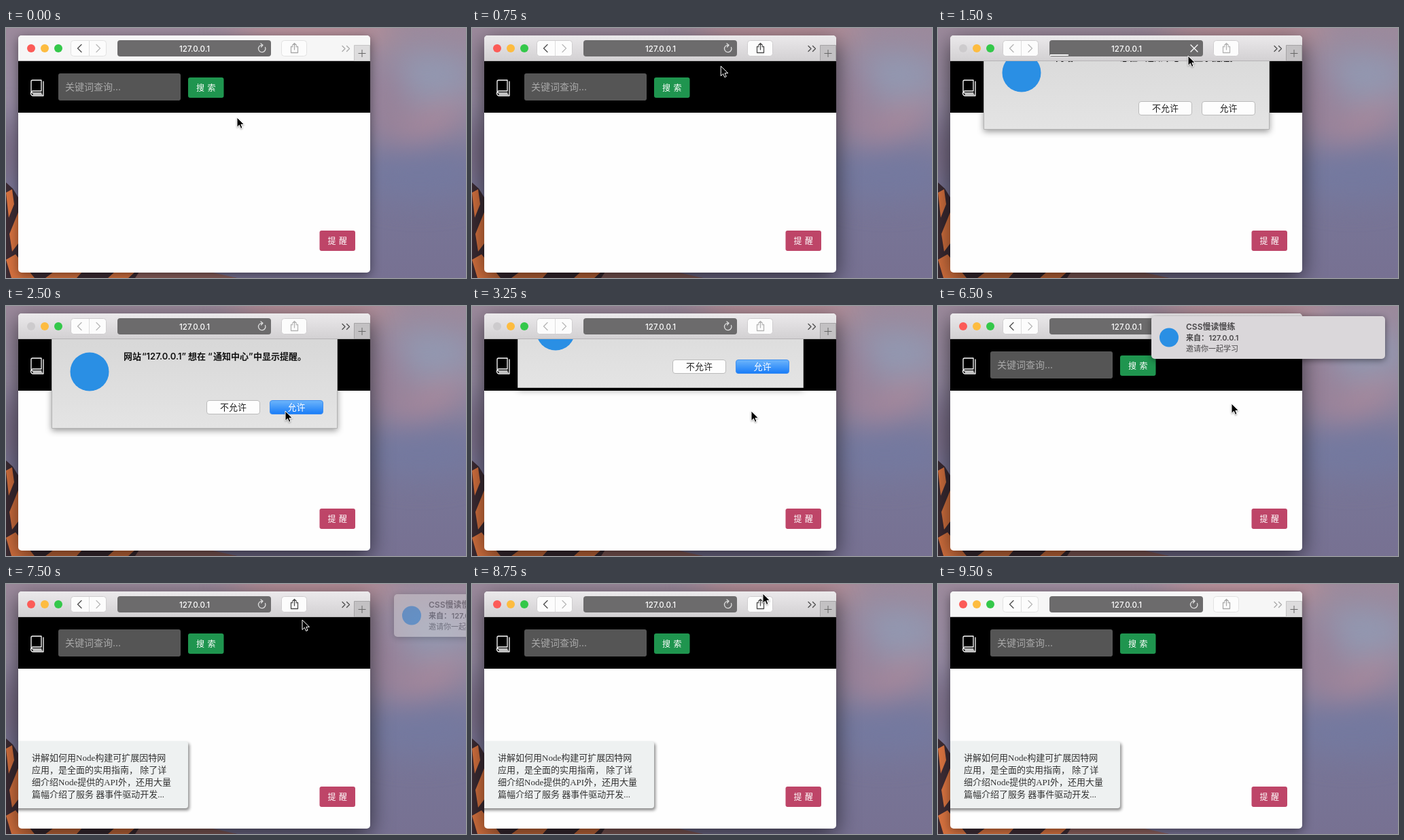
These frames come from a looping animation (677 by 369 pixels, 9.75 s). An HTML page:

```html
<!DOCTYPE html>
<html lang="zh-CN">
<head>
<meta charset="utf-8">
<style>
html, body { margin: 0; width: 100%; height: 100%; overflow: hidden }
svg { display: block; width: 677px; height: 369px; font: 13px Inter, "Noto Sans CJK SC", "Noto Sans CJK", sans-serif }
.line { fill: none; stroke-width: 1.3; stroke-linecap: round; stroke-linejoin: round }
.tool { fill: #fcfcfc; stroke: #cfcdcf }
.mid { text-anchor: middle }
.bold { font-weight: 600 }
.blur { filter: blur(22px) }
#frame { filter: drop-shadow(0 9px 16px #0009) }
#bar { fill: url(#barOn) }
#tab { fill: #c3c1c3; stroke: #a5a3a5 }
#close { fill: #fc5b57 } #shrink { fill: #fdbc40 } #grow { fill: #34c84a }
#back, #share, #more { stroke: #4c4c4c }
#next { stroke: #b9b9b9 }
#stop, #progress, #card, #dialog { display: none }

.idle #frame { filter: drop-shadow(0 4px 8px #0007) }
.idle #bar { fill: #f6f6f6 }
.idle #tab { fill: #dddcdd; stroke: #c6c6c6 }
.idle .lights circle { fill: #d9d8d9 }
.idle #share, .idle #more { stroke: #a9a9a9 }
.idle .tool { stroke: #e2e2e2 }

.ask #dialog { display: inline }
.ask #close { fill: #cdcbcd }
.ask #back, .ask #share { stroke: #b4b4b4 }
.load #stop, .load #progress { display: inline }
.load #reload { display: none }
.load #allow { fill: #fdfdfd; stroke: #bbb }
.load #allowText { fill: #222 }
.open #card { display: inline }
</style>
</head>
<body>
<svg id="stage" viewBox="0 0 677 369">
  <defs>
    <linearGradient id="sky" x2="0" y2="1">
      <stop stop-color="#9c8a9c"/><stop offset=".3" stop-color="#9489a0"/>
      <stop offset=".6" stop-color="#787799"/><stop offset="1" stop-color="#777192"/>
    </linearGradient>
    <linearGradient id="barOn" x2="0" y2="1"><stop stop-color="#ebe9eb"/><stop offset="1" stop-color="#d2d0d2"/></linearGradient>
    <linearGradient id="sheet" x2="0" y2="1"><stop stop-color="#d5d5d5"/><stop offset="1" stop-color="#e4e4e4"/></linearGradient>
    <linearGradient id="blue" x2="0" y2="1"><stop stop-color="#6db5fb"/><stop offset="1" stop-color="#187cf8"/></linearGradient>
    <clipPath id="below"><path d="M0 49H677V369H0Z"/></clipPath>
    <clipPath id="page"><path d="M18 49H536V361H18Z"/></clipPath>
  </defs>

  <rect width="677" height="369" fill="url(#sky)"/>
  <g class="blur">
    <ellipse cx="450" cy="0" rx="120" ry="30" fill="#b98f97"/>
    <ellipse cx="620" cy="70" rx="70" ry="34" fill="#9298b1"/>
    <ellipse cx="560" cy="110" rx="30" ry="60" fill="#978198"/>
    <ellipse cx="625" cy="140" rx="55" ry="16" fill="#b0899a" transform="rotate(-28 625 140)"/>
    <ellipse cx="610" cy="215" rx="90" ry="36" fill="#74799f"/>
    <ellipse cx="0" cy="185" rx="30" ry="50" fill="#766880"/>
  </g>
  <path fill="#3b2b33" d="M0 228L10 237 18 250 70 345 340 369H0Z"/>
  <path fill="#d4713f" d="M0 243L9 238 12 260 4 280ZM5 304L18 272V318L9 330ZM0 342L14 334 42 369H8ZM58 369L70 360H112L104 369ZM150 369L160 360H190L180 369Z"/>
  <path fill="#8a5f5c" d="M196 360H300L340 369H190Z"/>

  <rect id="frame" x="18" y="11" width="518" height="350" rx="5" fill="#fefefe"/>
  <path id="bar" d="M18 49V16a5 5 0 0 1 5-5H531a5 5 0 0 1 5 5V49Z"/>
  <path stroke="#b5b3b5" d="M18 48.5H536"/>
  <g class="lights">
    <circle id="close" cx="37" cy="30" r="6"/><circle id="shrink" cx="57" cy="30" r="6"/><circle id="grow" cx="77" cy="30" r="6"/>
  </g>
  <rect class="tool" x="95.5" y="18.5" width="52" height="23" rx="4"/>
  <path stroke="#dcdcdc" d="M122.5 19V41"/>
  <path id="back" class="line" d="M111 24.500L105.500 30 111 35.500"/>
  <path id="next" class="line" d="M133 24.500L138.500 30 133 35.500"/>
  <rect x="164" y="18" width="226" height="24" rx="4" fill="#6c6b6c"/>
  <text class="mid" x="277.500" y="34.500" fill="#fff" font-size="11.500" font-weight="500">127.0.0.1</text>
  <path id="progress" stroke="#fff" stroke-width="2" d="M165 40H192"/>
  <path id="reload" class="line" stroke="#ddd" d="M381.500 28.500A5.200 5.200 0 1 1 377 25.300M375 23L378 25.300 375.500 28"/>
  <path id="stop" class="line" stroke="#fff" d="M372 25L382 35M382 25L372 35"/>
  <rect class="tool" x="405.500" y="18.500" width="37" height="23" rx="4"/>
  <path id="share" class="line" d="M422 27.500H419.500V36.500H429.500V27.500H427M424.500 32V22.500M421.500 25.500L424.500 22.500 427.500 25.500"/>
  <path id="more" class="line" d="M495 26.500L499 30.500 495 34.500M501.500 26.500L505.500 30.500 501.500 34.500"/>
  <path id="tab" d="M512.500 48.500V25.500H535.500V48.500Z"/>
  <path stroke="#666" d="M518.500 37.500H529.500M524 32V43"/>

  <path d="M18 49H536V125H18Z"/>
  <path class="line" stroke="#fff" d="M52 96H40a3 3 0 0 1-3-3V79a2 2 0 0 1 2-2H52V93H40a2.500 2.500 0 0 0 0 7H55V79M40 98H53"/>
  <rect x="77" y="67" width="180" height="40" rx="3" fill="#555"/>
  <text x="87" y="92" font-size="14" fill="#a8a8a8">关键词查询...</text>
  <rect x="268" y="73" width="52.500" height="30" rx="3" fill="#1f954f"/>
  <text y="92.500" font-size="12" font-weight="500" fill="#fff"><tspan x="280">搜</tspan><tspan x="296.500">索</tspan></text>
  <rect x="461.500" y="299" width="52.500" height="30" rx="3" fill="#be4568"/>
  <text y="318.500" font-size="12" fill="#fff"><tspan x="473.500">提</tspan><tspan x="490">醒</tspan></text>

  <g id="card" clip-path="url(#page)">
    <path d="M10 232H264a4 4 0 0 1 4 4V327a4 4 0 0 1-4 4H10Z" fill="#eef1f1" style="filter:drop-shadow(2px 3px 2px #0007)"/>
    <g fill="#333" style="font-family:'Liberation Serif','Noto Sans CJK SC','Noto Sans CJK',serif">
      <text x="38" y="261">讲解如何用Node构建可扩展因特网</text>
      <text x="38" y="279">应用，是全面的实用指南， 除了详</text>
      <text x="38" y="297">细介绍Node提供的API外，还用大量</text>
      <text x="38" y="315">篇幅介绍了服务 器事件驱动开发...</text>
    </g>
  </g>

  <g clip-path="url(#below)"><g id="dialog">
    <path d="M67.500 20H487.500V180.500H67.500Z" fill="url(#sheet)" stroke="#b3b3b3" style="filter:drop-shadow(0 3px 5px #0006)"/>
    <circle cx="123" cy="97" r="28.500" fill="#2a8fe4"/>
    <text class="bold" y="79" fill="#111"><tspan x="173">网站</tspan><tspan x="200">“127.0.0.1”</tspan><tspan x="268">想在</tspan><tspan x="297">“</tspan><tspan x="305">通知中心</tspan><tspan x="357">”</tspan><tspan x="364">中显示提醒。</tspan></text>
    <rect x="295.500" y="139.500" width="78" height="20" rx="3.500" fill="#fdfdfd" stroke="#bbb"/>
    <text class="mid" x="334.500" y="154" fill="#222">不允许</text>
    <rect id="allow" x="388.500" y="139.500" width="78" height="20" rx="3.500" fill="url(#blue)" stroke="#3f8ff0"/>
    <text id="allowText" class="mid" x="427.500" y="154" fill="#fff">允许</text>
  </g></g>

  <g id="notice">
    <rect x="314" y="15" width="344" height="63" rx="5" fill="#dad7da" style="filter:drop-shadow(0 2px 5px #0007)"/>
    <circle cx="340" cy="46.500" r="14" fill="#2a8fe4"/>
    <g fill="#484648">
      <text class="bold" x="365" y="35" font-size="12">CSS慢读慢练</text>
      <text class="bold" y="51" font-size="11"><tspan x="365">来自：</tspan><tspan x="398.500">127.0.0.1</tspan></text>
      <text x="365" y="67" font-size="11">邀请你一起学习</text>
    </g>
  </g>

  <path id="cursor" d="M0 0V14.500L3.400 11.300 5.600 16.400 8 15.400 5.900 10.400H10.500Z" stroke="#fff" style="filter:drop-shadow(0 1px 1px #0005)"/>
</svg>
<script>
const LOOP = 9750, STEP = 250;
const $ = id => document.getElementById(id);

// Each key: time in ms, then the values to blend between.
const pointer = [[0, 340, 132], [1000, 375, 31], [1250, 375, 31], [1500, 368, 41], [2500, 411, 155],
  [4000, 411, 155], [4750, 480, 309], [6250, 480, 309], [6500, 432, 144], [7000, 436, 53],
  [8500, 436, 53], [9000, 420, -25]];
const sheetY = [[1250, -145], [1500, -31], [1750, 0], [3000, 0], [3250, -60], [3500, -145]];
const noticeX = [[5250, 380], [5500, 240], [5750, 40], [6000, 0], [7000, 0], [7250, 110], [7500, 257], [7750, 380]];

function blend(keys, t) {
  const i = keys.findIndex(k => k[0] > t);
  if (i < 0) return keys[keys.length - 1].slice(1);
  if (i === 0) return keys[0].slice(1);
  const a = keys[i - 1], b = keys[i], u = (t - a[0]) / (b[0] - a[0]);
  return a.slice(1).map((v, n) => v + (b[n + 1] - v) * u);
}

const move = (id, x, y) => $(id).setAttribute('transform', `translate(${x} ${y})`);

function draw(t) {
  const during = (name, from, to) => $('stage').classList.toggle(name, t >= from && t < to);
  $('stage').classList.toggle('idle', t < 750 || t >= 9250);
  during('ask', 1500, 3500);
  during('load', 1500, 1750);
  during('open', 7250, LOOP);
  move('cursor', ...blend(pointer, t));
  move('dialog', 0, blend(sheetY, t)[0]);
  const [x] = blend(noticeX, t);
  move('notice', x, 0);
  $('notice').setAttribute('opacity', 1 - x / 467);
}

const start = performance.now();
let last = -1;
function tick() {
  const t = Math.floor((performance.now() - start) % LOOP / STEP) * STEP;
  if (t !== last) draw(last = t);
  requestAnimationFrame(tick);
}
tick();
</script>
</body>
</html>
```
